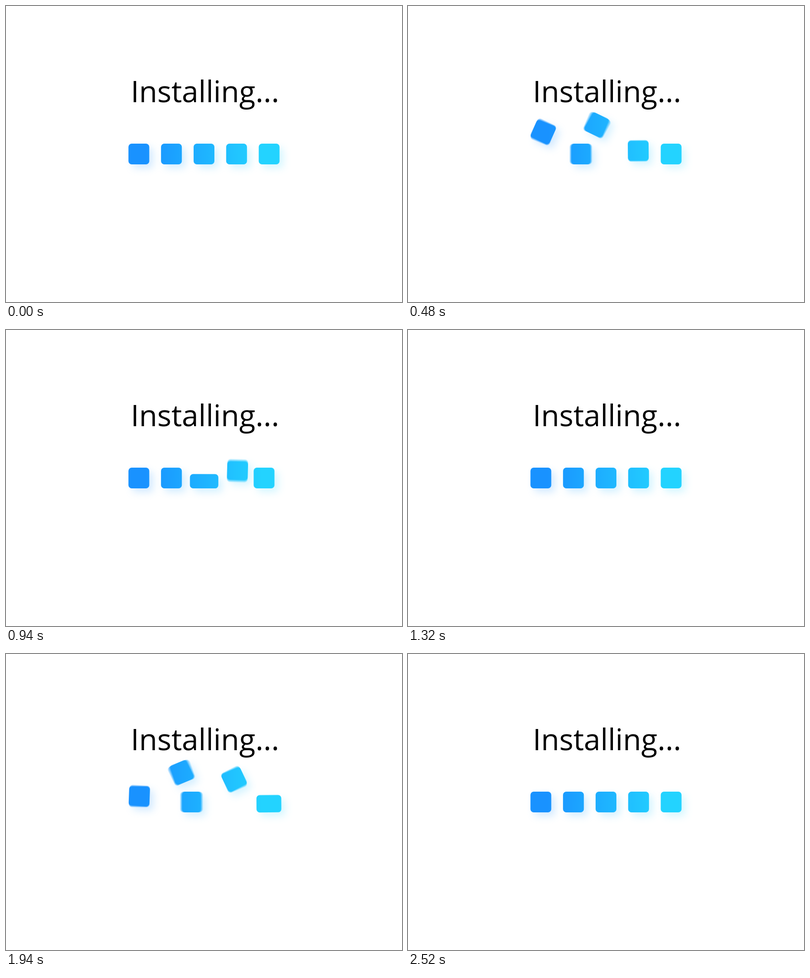
An HTML page with a canvas that plays this animation: 800 px wide and 600 px high, repeating every 2.64 s.

```html
<!DOCTYPE html>
<html lang="en">
<head>
<meta charset="utf-8">
<title>Installing</title>
<style>
  html, body { margin: 0; width: 100%; height: 100%; overflow: hidden; background: #fff; }
  canvas, svg { position: absolute; left: 0; top: 0; width: 800px; height: 600px; }
  text { font: 400 60px "Open Sans", sans-serif; fill: #000; }
</style>
</head>
<body>
<canvas id="stage" width="800" height="600"></canvas>
<svg viewBox="0 0 800 600"><text x="252" y="195">Installing...</text></svg>
<script>
const HALF = 1320, STEP = 20, SHUTTER = 10, SAMPLES = 8;
const SIZE = 42, RADIUS = 6.5, GAP = 65.8, FIRST = 268.4, FLOOR = 321;
const JUMPS = [360, 503, 639, 762]; // time at which each jumper crosses the middle of its gap

const ctx = document.getElementById('stage').getContext('2d');
const layer = document.createElement('canvas');
layer.width = 800;
layer.height = 600;
const pen = layer.getContext('2d');

const ramp = pen.createLinearGradient(282, 0, 518, 0);
ramp.addColorStop(0, 'rgb(25,146,255)');
ramp.addColorStop(1, 'rgb(35,211,255)');

const clamp = v => Math.min(1, Math.max(0, v));

// cubic-bezier(.6, 0, .4, 1)
function ease(v) {
  let lo = 0, hi = 1, s = 0.5;
  for (let i = 0; i < 24; i++) {
    const r = 1 - s;
    if (1.8 * s * r * r + 1.2 * s * s * r + s * s * s < v) lo = s; else hi = s;
    s = (lo + hi) / 2;
  }
  return s * s * (3 - 2 * s);
}

function travel(u) {
  if (u < -250) return 0;
  if (u > 360) return 1;
  return u < 0 ? 0.5 * Math.exp(u / 40) : 1 - 0.5 * Math.exp(-u / 62);
}

function lift(u) {
  if (u < 20) return (1 - Math.cos(Math.PI * clamp((u + 205) / 225))) / 2;
  return 1 - clamp((u - 20) / 180) ** 2;
}

function box(x, y, w, h, angle, flip) {
  pen.save();
  pen.translate(flip ? 800 - x : x, y);
  pen.rotate(flip ? -angle : angle);
  pen.beginPath();
  pen.roundRect(-w / 2, -h / 2, w, h, RADIUS);
  pen.fill();
  pen.restore();
}

function pose(t, flip) {
  box(FIRST + 4 * GAP * ease(clamp(t / 1150)), FLOOR - SIZE / 2, SIZE, SIZE, 0, flip);
  JUMPS.forEach((mid, i) => {
    const u = t - mid, go = travel(u);
    const turn = 0.3 * go + 0.7 * clamp((u + 145) / 315);
    const squash = Math.sin(Math.PI * clamp((u - 200) / 242)) ** 2;
    const h = SIZE - 14 * squash;
    box(FIRST + GAP * (i + 1 - go), FLOOR - h / 2 - 64.5 * lift(u),
        SIZE + 16.5 * squash, h, -Math.PI * turn, flip);
  });
}

function draw(time) {
  const t = time % HALF, flip = time >= HALF;

  // Motion blur: add up evenly spaced poses, then colour them by place
  pen.globalCompositeOperation = 'source-over';
  pen.clearRect(0, 0, 800, 600);
  pen.globalCompositeOperation = 'lighter';
  pen.fillStyle = '#000';
  pen.globalAlpha = 1 / SAMPLES;
  for (let k = 0; k < SAMPLES; k++) pose(t + SHUTTER * ((k + 0.5) / SAMPLES - 0.5), flip);
  pen.globalAlpha = 1;
  pen.globalCompositeOperation = 'source-in';
  pen.fillStyle = ramp;
  pen.fillRect(0, 0, 800, 600);

  ctx.clearRect(0, 0, 800, 600);
  ctx.globalAlpha = 0.18;
  ctx.filter = 'blur(7.5px)';
  ctx.drawImage(layer, 8, 8);
  ctx.globalAlpha = 1;
  ctx.filter = 'none';
  ctx.drawImage(layer, 0, 0);
}

const start = performance.now();
function tick() {
  const now = performance.now() - start;
  draw(Math.floor(now / STEP + 0.01) * STEP % (2 * HALF));
  requestAnimationFrame(tick);
}
tick();
</script>
</body>
</html>
```
